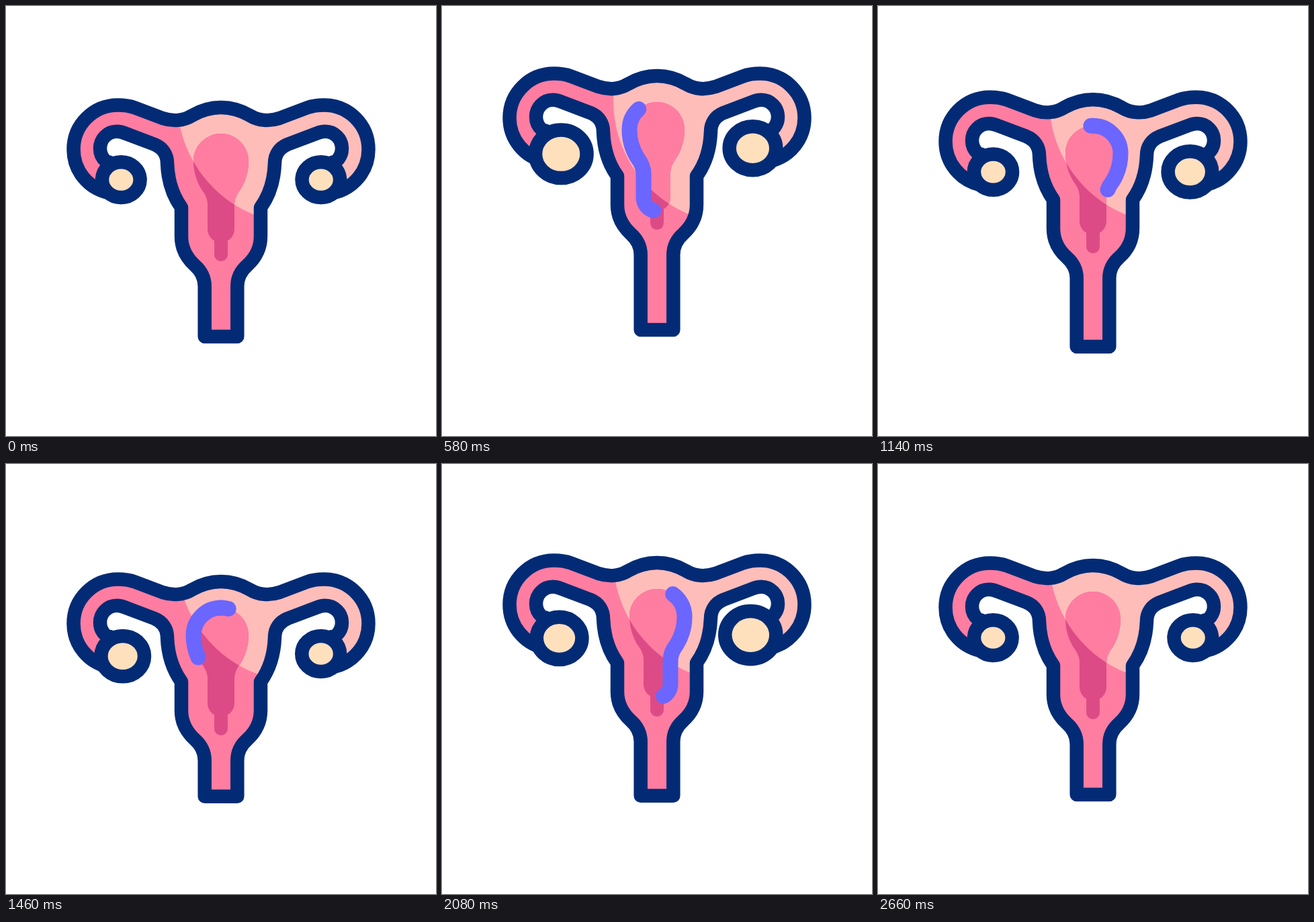
An HTML page that plays this animation: 640x640 px, repeating every 3600 ms.

```html
<!DOCTYPE html>
<html lang="en">
<head>
<meta charset="utf-8">
<title>Uterus icon</title>
<style>
  html, body { margin: 0; width: 100%; height: 100%; overflow: hidden; background: #fff; }
  svg { display: block; width: 100vw; height: 100vh; }
</style>
</head>
<body>
<svg viewBox="0 0 640 640">
  <defs>
    <clipPath id="shine"><circle cx="438" cy="141" r="183"/></clipPath>
    <path id="bulb" d="M320 190C297.400 190 279 208.400 279 231C279 247 284 262 291 273C297 281 300 288 300 296V332C300 343 309 352 320 352C331 352 340 343 340 332V296C340 288 343 281 349 273C356 262 361 247 361 231C361 208.400 342.600 190 320 190Z"/>
    <g id="womb">
      <use href="#bulb"/>
      <path d="M320 350V370" fill="none" stroke="currentColor" stroke-width="20" stroke-linecap="round"/>
    </g>
  </defs>
  <path class="body" fill="#ff7da1"/>
  <g clip-path="url(#shine)"><path class="body" fill="#ffbdb9"/></g>
  <g class="lift" fill="#dd4b86" color="#dd4b86"><use href="#womb"/></g>
  <g clip-path="url(#shine)">
    <g class="lift" fill="#ff7da1" color="#ff7da1"><use href="#womb"/></g>
  </g>
  <path class="body" fill="none" stroke="#032b75" stroke-width="20.500" stroke-linejoin="round"/>
  <g class="lift">
    <g fill="#ffe0bd" stroke="#032b75" stroke-width="20.500">
      <ellipse id="left"/>
      <ellipse id="right"/>
    </g>
    <g fill="none" stroke="#6b66ff" stroke-width="23" stroke-linecap="round">
      <path class="trace" pathLength="1"/>
      <path class="trace" pathLength="1"/>
    </g>
  </g>
</svg>
<script>
const LOOP = 3600, LAP = 1080;
const all = s => [...document.querySelectorAll(s)];
const bodies = all('.body'), lifted = all('.lift'), traces = all('.trace');
const left = document.getElementById('left'), right = document.getElementById('right');
const outline = document.getElementById('bulb').getAttribute('d');
traces.forEach(p => p.setAttribute('d', outline));

// Keys are [time, value, leaving slope]; every key is reached at rest.
const topKeys = [[0, 0, .62], [720, -51, 0], [800, -51, 0], [1460, 24, 0],
  [1860, -17, 0], [2260, 5.6, 0], [2660, 0, 0]];
const endKeys = [[0, 0, 0], [400, -10, 0], [720, -10, 0], [1240, 17.7, 0],
  [1680, -12, 0], [2200, 4, 0], [2660, 0, 0]];

function ease(t, from, to) {
  const s = Math.min(1, Math.max(0, (t - from) / (to - from)));
  return s * s * (3 - 2 * s);
}

function track(keys, t) {
  for (let i = 1; i < keys.length; i++) {
    const [t0, v0, m] = keys[i - 1], [t1, v1] = keys[i];
    if (t < t1) {
      const s = (t - t0) / (t1 - t0);
      return v0 + (v1 - v0) * (ease(t, t0, t1) + m * s * (1 - s) * (1 - s));
    }
  }
  return keys[keys.length - 1][1];
}

// Two swells of 1200 ms each
function swell(t) {
  if (t <= 0 || t >= 2400) return 0;
  t %= 1200;
  return ease(t < 600 ? t : 1200 - t, 0, 600);
}

// Left half from the top centre to the lower end: [command, points]
const half = [
  ['C', [302, 151, 289, 156, 277, 163]],
  ['C', [264, 171, 248, 172, 233, 167]],
  ['L', [192, 151.5]],
  ['C', [184, 148.5, 176, 147.5, 166.5, 147.5]],
  ['C', [130, 147.5, 100.5, 177, 100.5, 213.5]],
  ['C', [100.5, 245, 122, 271, 152, 278]],
  ['L', [155, 233]],
  ['L', [148.5, 231]],
  ['C', [143, 226, 140, 219, 140, 212]],
  ['C', [140, 198, 151, 186.8, 165, 186.8]],
  ['C', [169, 186.8, 173, 187.8, 177, 189.3]],
  ['L', [221, 206]],
  ['C', [233, 211, 240, 221, 240, 234]],
  ['C', [241, 262, 248, 282, 261, 300]],
  ['L', [261, 343]],
  ['C', [261, 362, 270, 376, 281, 386]],
  ['C', [290, 394, 295.7, 405, 295.7, 417]]
];

function bodyPath(dy, end) {
  const move = (pts, flip) => pts.map((v, i) => i % 2 ? v + dy : flip ? 640 - v : v);
  const bottom = 492 + end;
  let d = `M320 ${151 + dy}`;
  for (const [c, pts] of half) d += c + move(pts).join(' ');
  d += `V${bottom}H344.3`;
  // Walk the same half backwards, mirrored
  d += 'L' + move(half[half.length - 1][1].slice(-2), true).join(' ');
  for (let i = half.length - 1; i >= 0; i--) {
    const [c, p] = half[i];
    const start = i ? half[i - 1][1].slice(-2) : [320, 151];
    const pts = c === 'C' ? [p[2], p[3], p[0], p[1], ...start] : start;
    d += c + move(pts, true).join(' ');
  }
  return d + 'Z';
}

function ovary(el, cx, cy, k) {
  const a = { cx, cy, rx: 28.3 + 10 * k, ry: 26.4 + 9.4 * k };
  for (const n in a) el.setAttribute(n, a[n]);
}

function trace(el, t) {
  const tip = ease(t, 0, 1180), tail = ease(t, 380, 1580), len = tip - tail;
  el.style.display = t > 0 && len > 0 ? '' : 'none';
  el.setAttribute('stroke-dasharray', `${len} 2`);
  el.setAttribute('stroke-dashoffset', -tail);
}

function draw(t) {
  const dy = track(topKeys, t);
  const d = bodyPath(dy, track(endKeys, t));
  bodies.forEach(p => p.setAttribute('d', d));
  lifted.forEach(g => g.setAttribute('transform', `translate(0 ${dy})`));
  const l = swell(t), r = swell(t - 220);
  ovary(left, 171.3 + 6 * l, 258.6 + 8.7 * l, l);
  ovary(right, 468.8 - 9.8 * r, 258.6, r);
  traces.forEach((p, i) => trace(p, t - i * LAP));
}

let begin;
function tick(now) {
  if (begin === undefined) begin = now;
  draw((now - begin) % LOOP);
  requestAnimationFrame(tick);
}
draw(0);
requestAnimationFrame(tick);
</script>
</body>
</html>
```
